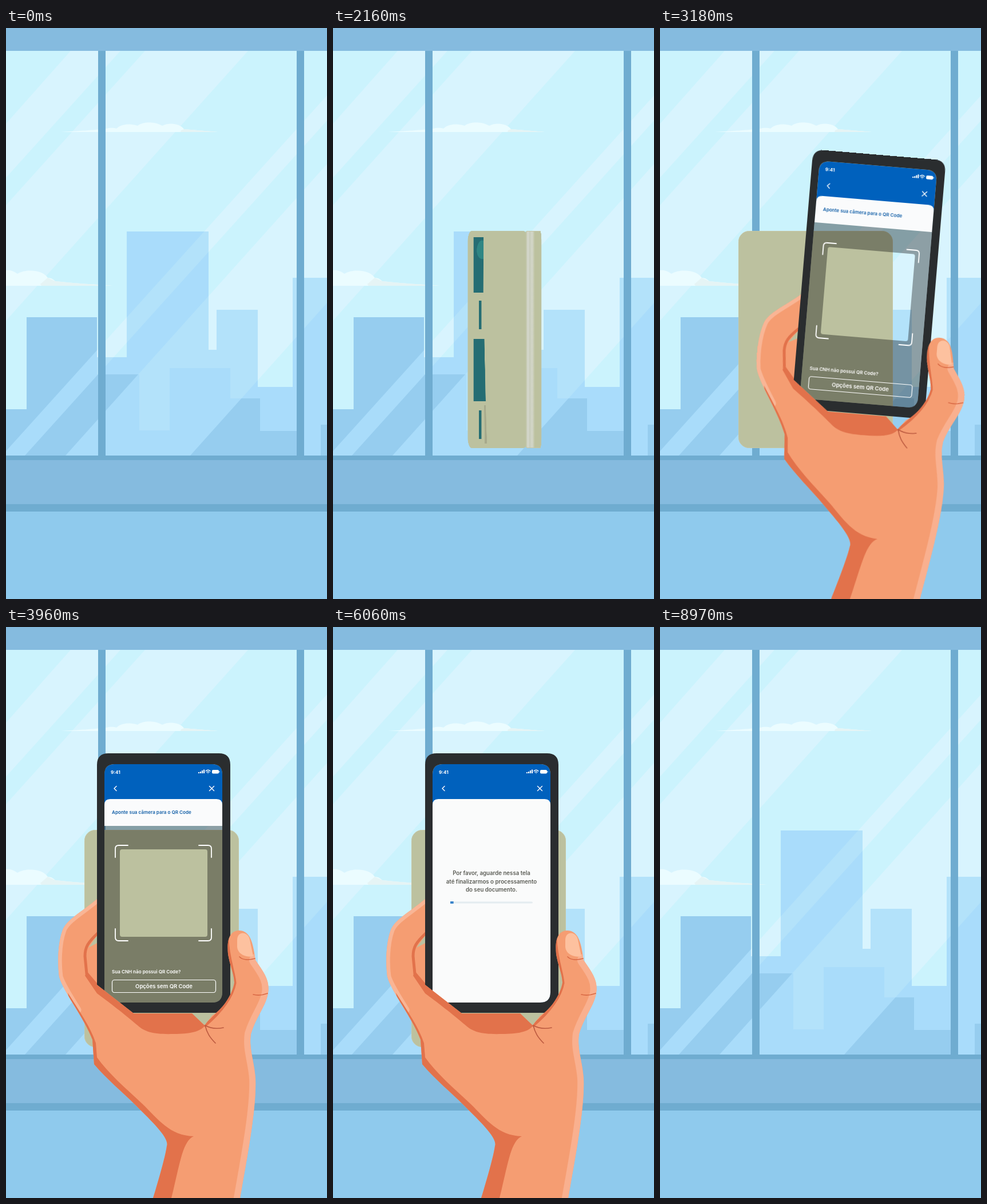
These frames come from a looping animation (561 px wide and 999 px high, 9 s). An HTML page without scripts:

```html
<!DOCTYPE html>
<html lang="pt-BR">
<head>
<meta charset="utf-8">
<title>Leitura do documento</title>
<style>
html, body { margin: 0; width: 100%; height: 100%; overflow: hidden; background: #8fcaed; }
svg { display: block; width: 100%; height: 100%; }
text { font-family: Inter, "Open Sans", sans-serif; font-weight: 600; }
.mid { text-anchor: middle; }
.line { fill: none; stroke-linecap: round; stroke-linejoin: round; }

#card, #front, #back, #shine, #hand, #wait, #bar { animation: 9s linear infinite; }
#card { transform-origin: 272px 545px; animation-name: card; }
#front, #back { transform-origin: 137px 0; }
#front { animation-name: front; }
#back { animation-name: back; }
#shine { animation-name: shine; }
#hand { transform-origin: 330px 891px; animation-name: hand; }
#wait { animation-name: wait; }
#bar { transform-origin: 205px 0; animation-name: bar; }

@keyframes card {
  0%, 11.1% { transform: scale(0); animation-timing-function: cubic-bezier(.2, .8, .3, 1); }
  16.7%, 85.5% { transform: none; animation-timing-function: cubic-bezier(.6, 0, .8, .3); }
  90%, 100% { transform: scale(0); }
}
@keyframes front {
  0%, 21.6% { transform: none; animation-timing-function: ease-in; }
  24% { transform: translateX(98px) scaleX(.39); }
  25.1%, 100% { transform: translateX(150px) scaleX(0); }
}
@keyframes back {
  0%, 22.8% { transform: translateX(250px) scaleX(0); }
  24% { transform: translateX(200px) scaleX(.1); }
  25.1% { transform: translateX(150px) scaleX(.38); animation-timing-function: ease-out; }
  27.5%, 100% { transform: none; }
}
@keyframes shine {
  0%, 24.3% { opacity: 1; }
  27%, 100% { opacity: 0; }
}
@keyframes hand {
  0%, 31.33% { transform: translate(60px, 820px) rotate(9deg); animation-timing-function: cubic-bezier(.2, .5, .4, 1); }
  35.33% { transform: translate(50px, 3px) rotate(4.8deg); animation-timing-function: ease-in-out; }
  41% { transform: translate(-4px, 0) rotate(0deg); }
  44% { transform: translate(-2px, 0) rotate(0deg); animation-timing-function: ease-out; }
  48%, 76.67% { transform: translate(0, 0) rotate(0deg); animation-timing-function: cubic-bezier(.5, 0, .8, .7); }
  83% { transform: translate(300px, 70px) rotate(36deg); }
  84.4% { transform: translate(480px, 300px) rotate(46deg); animation-timing-function: step-start; }
  84.5%, 100% { transform: translate(60px, 820px) rotate(9deg); }
}
@keyframes wait {
  0%, 60% { opacity: 0; }
  62%, 90% { opacity: 1; }
  90.1%, 100% { opacity: 0; }
}
@keyframes bar {
  0%, 66% { transform: scaleX(0); animation-timing-function: ease-in-out; }
  75.6%, 100% { transform: scaleX(1); }
}
</style>
</head>
<body>
<svg viewBox="0 0 561 999" preserveAspectRatio="none">
<defs>
  <!-- diagonal reflections on the glass -->
  <path id="bands" d="M113 40H200L-20 284V190ZM243 40H423L0 512V310ZM561 118V162L33 748H-7ZM561 238V481L322 748H104Z"/>
  <path id="far" d="M159 748V576H211V356H354V563H368V493H440V628H501V437H561V748Z"/>
  <path id="near" d="M0 748V667H36V506H159V606H233V704H286V595H392V648H444V705H512V748ZM550 748V694H561V748Z"/>
  <clipPath id="farClip"><use href="#far"/></clipPath>
  <clipPath id="nearClip"><use href="#near"/></clipPath>

  <path id="skin" d="M161 476C135 498 108 512 101 530C92 555 92 590 95 612C103 640 138 682 153 722L156 765C180 793 205 813 230 838C260 868 288 895 283 908C281 925 268 970 259 999L200 1300H365L411 999C425 920 440 840 438 790C436 760 426 738 430 712C440 680 457 662 460 640C463 620 455 607 438 583C434 555 430 531 409 531C392 532 388 548 390 572C394 595 400 605 401 622C398 642 382 668 362 680L349 697L327 676H225L161 626V553L146 561L161 540Z"/>
  <clipPath id="skinClip"><use href="#skin"/></clipPath>
  <linearGradient id="spine">
    <stop offset="0" stop-color="#bcc19f"/>
    <stop offset=".25" stop-color="#d6d9cf"/>
    <stop offset=".45" stop-color="#c9cdbb"/>
    <stop offset=".7" stop-color="#d4d7ca"/>
    <stop offset="1" stop-color="#bcc19f"/>
  </linearGradient>
</defs>

<!-- sky and city -->
<rect width="561" height="999" fill="#cbf3fd"/>
<use href="#bands" fill="#d8f4fe"/>
<g fill="#ebfcff">
  <path d="M97 182C125 180 150 179 176 176C182 174 190 175 193 176C202 167 219 167 230 171C241 163 262 164 273 171C287 164 305 168 311 177L370 182Z"/>
  <path d="M0 424C8 423 14 426 20 430C35 421 64 423 73 437C80 437 84 441 86 443C120 447 150 448 186 451H0Z"/>
</g>
<path d="M306 179L311 177L370 182H305ZM60 448L73 437L86 443C120 447 150 448 186 451H62Z" fill="#e5f4f5"/>
<use href="#far" fill="#a9dcfb"/>
<g clip-path="url(#farClip)"><use href="#bands" fill="#b3e2fa"/></g>
<use href="#near" fill="#96cdef"/>
<g clip-path="url(#nearClip)"><use href="#bands" fill="#a9dcfa"/></g>

<!-- window frame -->
<path d="M0 0H561V40H0ZM0 756H561V833H0Z" fill="#85bbdf"/>
<path d="M161 40H174V748H161ZM508 40H521V748H508ZM0 748H561V756H0ZM0 833H561V846H0Z" fill="#6facd0"/>
<rect y="846" width="561" height="153" fill="#8fcaed"/>

<!-- document -->
<g id="card">
  <g id="front">
    <rect x="137" y="355" width="270" height="380" rx="18" fill="#bcc19f"/>
    <path d="M163 366H209L207 463H163ZM163 544H212L218 653H163ZM188 477H199V527H188ZM188 669H199V719H188Z" fill="#256d73"/>
    <path d="M208 372V404C185 406 172 394 180 382C186 374 196 370 208 372Z" fill="#2f8684"/>
    <path d="M211 660H218L224 727H214Z" fill="#a7aa8c"/>
  </g>
  <g id="back">
    <rect x="137.5" y="355.5" width="269" height="379" rx="18" fill="#bcc19f" stroke="#c5c5a4"/>
    <rect id="shine" x="137" y="356" width="160" height="378" fill="url(#spine)"/>
  </g>
</g>

<g id="hand">
  <!-- camera screen -->
  <path d="M174 347H380V639Q380 657 362 657H192Q174 657 174 639ZM205 389Q201 389 201 393V538Q201 542 205 542H350Q354 542 354 538V393Q354 389 350 389Z" fill-rule="evenodd" fill-opacity=".35"/>
  <path d="M174 348V258Q174 240 192 240H362Q380 240 380 258V348Z" fill="#0061bd"/>
  <path d="M174 348V311Q174 301 184 301H370Q380 301 380 311V348Z" fill="#fafbfc"/>
  <text x="187" y="327" font-size="8.1" fill="#1460a8">Aponte sua câmera para o QR Code</text>
  <path class="line" d="M193 403V388Q193 382 199 382H215M339 382H355Q361 382 361 388V403M361 528V543Q361 549 355 549H339M215 549H199Q193 549 193 543V528" stroke="#fff" stroke-width="1.8"/>
  <g fill="#fff">
    <text x="187" y="606" font-size="8.1">Sua CNH não possui QR Code?</text>
    <text class="mid" x="278" y="632" font-size="9.5">Opções sem QR Code</text>
  </g>
  <rect x="187.500" y="617.500" width="181" height="22" rx="4" fill="none" stroke="#fff" stroke-width="1.2"/>

  <!-- waiting screen -->
  <g id="wait">
    <path d="M174 301H380V639Q380 657 362 657H192Q174 657 174 639Z" fill="#0061bd"/>
    <path d="M174 311Q174 301 184 301H370Q380 301 380 311V639Q380 657 362 657H192Q174 657 174 639Z" fill="#fafbfb"/>
    <g class="mid" font-size="9.7" fill="#5b5c55">
      <text x="277" y="434">Por favor, aguarde nessa tela</text>
      <text x="277" y="448.500">até finalizarmos o processamento</text>
      <text x="277" y="463">do seu documento.</text>
    </g>
    <rect x="205" y="480.500" width="144" height="3" rx="1.500" fill="#e4ecf0"/>
    <rect id="bar" x="205" y="480.500" width="144" height="3" fill="#0061bd"/>
  </g>

  <!-- status bar and buttons -->
  <text x="185" y="257" font-size="8.2" fill="#fff" style="font-weight:700">9:41</text>
  <path d="M338 254H340V256H338ZM341 253H343V256H341ZM344 251H346V256H344ZM347 249.500H349V256H347Z" fill="#fff"/>
  <path class="line" d="M351 252Q355 248.500 359 252M353 254Q355 252.500 357 254M355 256V256" stroke="#fff" stroke-width="1.3"/>
  <rect x="362" y="250" width="12" height="6.500" rx="2" fill="#fff"/>
  <rect x="374.500" y="252" width="1" height="2.500" fill="#fff"/>
  <path class="line" d="M195 278.500L191 282.500L195 286.500M357.500 278.500L365.500 286.500M365.500 278.500L357.500 286.500" stroke="#fff" stroke-width="1.4"/>

  <!-- phone body -->
  <path d="M181 221H374Q394 221 394 241V655Q394 675 374 675H181Q161 675 161 655V241Q161 221 181 221ZM192 240Q174 240 174 258V639Q174 657 192 657H362Q380 657 380 639V258Q380 240 362 240Z" fill-rule="evenodd" fill="#2a2d2f"/>

  <!-- hand -->
  <use href="#skin" fill="#f59d72"/>
  <g clip-path="url(#skinClip)">
    <path class="line" d="M161 476C135 498 108 512 101 530C92 555 92 590 95 612C101 630 115 650 127 670" stroke="#f9b595" stroke-width="13"/>
    <path class="line" d="M438 583C455 607 463 620 460 640C457 662 440 680 430 712C426 738 436 760 438 790C440 840 425 920 411 999L365 1300" stroke="#f9b08f" stroke-width="22"/>
    <g fill="#e2724b">
      <path d="M110 640C130 672 150 700 159 728L161 753C180 780 210 806 240 834C268 861 288 890 330 891C310 900 306 940 291 999L235 1300H150L250 930L140 790Z"/>
      <path d="M161 623L225 674H327L350 697C342 708 325 712 295 712C262 713 245 709 232 697C210 678 180 655 161 641L140 610L143 602Z"/>
    </g>
    <path class="line" d="M163 535C145 552 140 560 140 576L143 607L161 630M389 545C390 580 401 605 402 623C398 645 380 672 350 697" stroke="#e2724b" stroke-width="5"/>
  </g>
  <path d="M406 548C406 531 425 532 428 547L434 576C419 579 407 571 406 560Z" fill="#fdc19f"/>
  <path class="line" d="M410 577C416 583 427 583 437 580M434 643C442 645 451 644 459 641" stroke="#d96945" stroke-width="1.7"/>
  <path class="line" d="M350 697C353 710 358 718 368 728M350 697C360 703 372 703 382 701" stroke="#bd5b40" stroke-width="1.7"/>
</g>
</svg>
</body>
</html>
```
